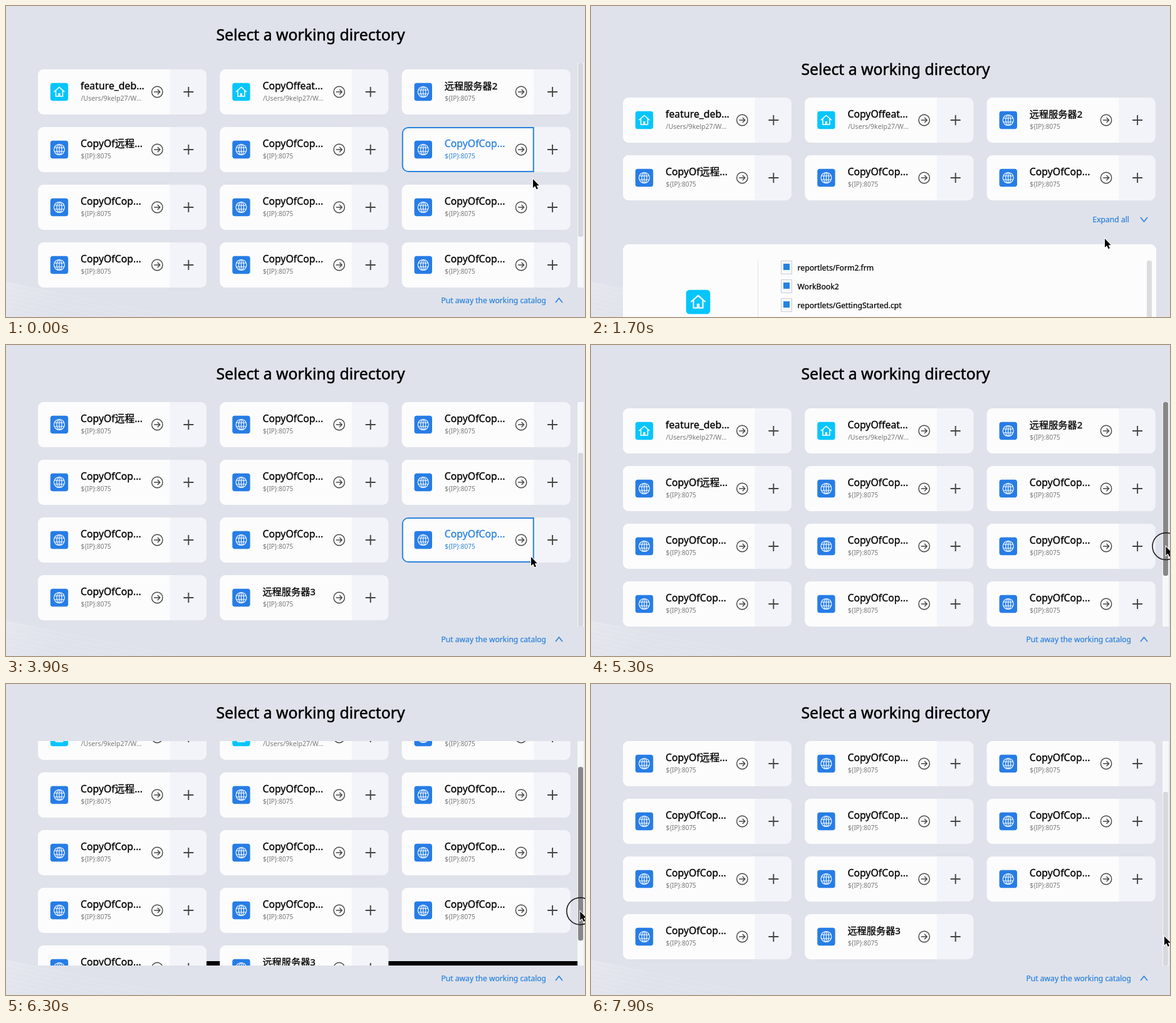
These frames come from a looping animation (924x496 px, 8000 ms). An HTML page with a canvas:

```html
<!DOCTYPE html>
<html lang="en">
<head>
<meta charset="utf-8">
<title>Working directory</title>
<style>
  html, body { margin: 0; height: 100%; overflow: hidden; background: #dfe2ea; }
  canvas { display: block; }
</style>
</head>
<body>
<canvas id="stage" width="924" height="496"></canvas>
<script>
const ctx = document.getElementById('stage').getContext('2d');
const LOOP = 8000, STEP = 100;
const BLUE = '#2b82dd', WHITE = '#fcfcfd', INK = '#444';
const FONT = '"Noto Sans", "Noto Sans CJK SC", "Noto Sans CJK", sans-serif';
const VIEW = { x: 51, top: 91, bottom: 449, right: 912 };
const CARD = { w: 269, main: 210.5, h: 72, dx: 290.4, dy: 92 };
const THUMB_RATIO = 0.794;

const names = ['feature_deb...', 'CopyOffeat...', '远程服务器2', 'CopyOf远程...',
  ...Array(9).fill('CopyOfCop...'), '远程服务器3'];
const files = ['reportlets/Form2.frm', 'WorkBook2', 'reportlets/GettingStarted.cpt', 'WorkBook1'];

// [time, value...]
const scrollKeys = [[2600, 0], [2700, 30], [3000, 102], [3200, 102], [3500, 0], [3600, 0],
  [3800, 102], [4000, 102], [4400, 0], [5400, 0], [5800, 24], [5900, 26], [6600, 71],
  [6700, 71], [7500, 102]];
const cursorKeys = [[-100, 841, 262], [0, 841, 276], [500, 868, 430], [800, 875, 463],
  [1100, 875, 463], [1700, 820, 371], [2000, 838, 338], [4300, 838, 338], [4800, 917.5, 321.5],
  [5900, 917.5, 321.5], [6700, 915, 321.5]];

function track(keys, t) {
  const next = keys.findIndex(k => k[0] > t);
  if (next < 0) return keys[keys.length - 1].slice(1);
  if (next === 0) return keys[0].slice(1);
  const a = keys[next - 1], b = keys[next], p = (t - a[0]) / (b[0] - a[0]);
  return a.slice(1).map((v, i) => v + (b[i + 1] - v) * p);
}

const between = (t, a, b) => t >= a && t < b;
const scrollAt = t => Math.round(track(scrollKeys, t)[0]);

function cursorAt(t) {
  const [x, y] = track(cursorKeys, t);
  return { x, y: t > 5000 ? y + scrollAt(t) * THUMB_RATIO : y };
}

function box(x, y, w, h, r, fill) {
  ctx.beginPath();
  ctx.roundRect(x, y, w, h, r);
  ctx.fillStyle = fill;
  ctx.fill();
}

// A hairline outline gives larger labels a slightly heavier weight.
function text(str, x, y, size, color = '#000', align = 'left') {
  ctx.font = `${size}px ${FONT}`;
  ctx.textAlign = align;
  ctx.fillStyle = ctx.strokeStyle = color;
  ctx.fillText(str, x, y);
  if (size < 11) return;
  ctx.lineWidth = size / 50;
  ctx.strokeText(str, x, y);
}

function stroke(path, color, width) {
  ctx.strokeStyle = color;
  ctx.lineWidth = width;
  ctx.stroke(new Path2D(path));
}

function at(x, y, scale, draw) {
  ctx.save();
  ctx.translate(x, y);
  ctx.scale(scale, scale);
  draw();
  ctx.restore();
}

function homeIcon() {
  box(-14.2, -14.2, 28.4, 28.4, 4, '#06c5fc');
  stroke('M-8.5 0L0 -7.5L8.5 0M-5.5 -2V7H5.5V-2', '#fff', 1.6);
  stroke('M0 7V2', '#fff', 3.2);
}

function globeIcon() {
  box(-14.2, -14.2, 28.4, 28.4, 4, '#277de6');
  stroke('M-8.5 0A8.5 8.5 0 1 1 8.5 0A8.5 8.5 0 1 1 -8.5 0M-4 0A4 8.5 0 1 1 4 0A4 8.5 0 1 1 -4 0' +
    'M0 -8.5V8.5M-8 -3H8M-8 3H8', '#fff', 1.1);
}

function card(i, x, y, hovered) {
  box(x, y, CARD.w, CARD.h, 9, '#f2f4f9');
  box(x, y, CARD.main, CARD.h, [9, 0, 0, 9], WHITE);
  if (hovered) {
    ctx.beginPath();
    ctx.roundRect(x + 1, y + 1, CARD.main - 1.5, CARD.h - 2, [9, 0, 0, 9]);
    ctx.strokeStyle = BLUE;
    ctx.lineWidth = 2;
    ctx.stroke();
  }
  const local = i < 2;
  at(x + 34, y + 36, 1, local ? homeIcon : globeIcon);
  text(names[i], x + 68, y + 32, names[i][0] === '远' ? 15.2 : 15.8, hovered ? BLUE : '#000');
  text(local ? '/Users/9kelp27/W...' : '${IP}:8075', x + 68.5, y + 50, local ? 10.6 : 10,
    hovered ? BLUE : '#777');
  at(x + 190.3, y + 36, 1, () =>
    stroke('M-8.7 0A8.7 8.7 0 1 1 8.7 0A8.7 8.7 0 1 1 -8.7 0M-5 0H4.5M0.5 -4L4.5 0L0.5 4', INK, 1.4));
  at(x + 240.3, y + 36, 1, () => stroke('M-8 0H8M0 -8V8', INK, 1.9));
}

function cards(top, count, pointer, pointerTop) {
  for (let i = 0; i < count; i++) {
    const x = VIEW.x + i % 3 * CARD.dx, row = Math.floor(i / 3) * CARD.dy;
    const dx = pointer.x - x, dy = pointer.y - pointerTop - row;
    const hovered = between(dx, 0, CARD.main + 1) && between(dy, 0, CARD.h);
    card(i, x, top + row, hovered && pointer.y < VIEW.bottom);
  }
}

function background() {
  ctx.fillStyle = '#dfe2ea';
  ctx.fillRect(0, 0, 924, 496);
  const glow = ctx.createLinearGradient(0, 440, 60, 500);
  glow.addColorStop(0, '#e4e7ed');
  glow.addColorStop(1, '#dfe2ea');
  ctx.fillStyle = glow;
  ctx.fill(new Path2D('M0 440L120 462L290 496H0Z'));
  for (let i = 0; i < 9; i++)
    stroke(`M0 ${442 + i * 7}L${270 - i * 20} ${496 + i * 4}`, 'rgba(255,255,255,.14)', 1);
}

function link(label, x, y, flip) {
  text(label, x, y + 4, 12.1, BLUE);
  at(882.5, y, 1, () => stroke(`M-5.5 ${3.5 * flip}L0 ${-3.5 * flip}L5.5 ${3.5 * flip}`, BLUE, 1.6));
}

function collapsedView(pointer) {
  text('Select a working directory', 486, 110, 24.8, '#000', 'center');
  cards(146, 6, pointer, 146);
  link('Expand all', 800.5, 340.5, -1);
  box(51, 380, 851, 130, 9, WHITE);
  ctx.fillStyle = '#e2e3e6';
  ctx.fillRect(266, 405, 1, 91);
  box(887, 406, 8, 100, 3, '#dcdcde');
  at(171, 472, 38 / 28, homeIcon);
  files.forEach((name, i) => {
    const y = 417 + i * 30;
    box(303, y - 11, 18, 22, 1, '#c9ced6');
    box(304, y - 10, 16, 20, 1, '#f6f8fa');
    box(307, y - 6, 10, 10, 0, '#2483e2');
    text(name, 329.5, y + 5, 12.2);
  });
}

function expandedView(t, pointer) {
  const scroll = scrollAt(t), previous = scrollAt(t - STEP);
  const exposed = Math.max(0, scroll - previous);
  text('Select a working directory', 486, 55, 24.8, '#000', 'center');
  ctx.save();
  ctx.beginPath();
  ctx.rect(VIEW.x - 1, VIEW.top, VIEW.right - VIEW.x + 1, VIEW.bottom - VIEW.top);
  ctx.clip();
  // Newly uncovered rows show black until they are repainted.
  ctx.fillStyle = '#000';
  ctx.fillRect(VIEW.x, VIEW.bottom - exposed, VIEW.right - VIEW.x, exposed);
  cards(101 - scroll, names.length, pointer, 101 - previous);
  ctx.restore();

  const dragging = between(t, 5000, 7700);
  const shown = dragging ? scroll : previous;
  ctx.fillStyle = '#f6f7f9';
  ctx.fillRect(912, 91, 10, 358);
  box(913, 91 + shown * THUMB_RATIO, 8, 277, 3, dragging ? '#878787' : '#d7d8db');
  link('Put away the working catalog', 694.5, 469.5, 1);
}

function drawCursor({ x, y }, pressed) {
  if (pressed) {
    ctx.beginPath();
    ctx.arc(x, y - 0.5, 21.5, 0, 7);
    ctx.strokeStyle = '#111';
    ctx.lineWidth = 1.5;
    ctx.stroke();
  }
  at(x, y, 1, () => {
    const arrow = 'M0 0V14L3.2 11L5.6 16.3L8 15.2L5.7 10.2H9.8Z';
    stroke(arrow, '#fff', 2);
    ctx.fillStyle = '#000';
    ctx.fill(new Path2D(arrow));
  });
}

function frame(now) {
  const t = Math.floor(now % LOOP / STEP) * STEP;
  const pointer = cursorAt(t - STEP);
  background();
  if (between(t, 1000, 2100)) collapsedView(pointer);
  else expandedView(t, pointer);
  const pressed = between(t, 900, 1100) || between(t, 2000, 2200) || between(t, 5100, 7600);
  drawCursor(cursorAt(t), pressed);
}

const start = performance.now();
function tick() {
  frame(performance.now() - start);
  requestAnimationFrame(tick);
}
tick();
</script>
</body>
</html>
```
